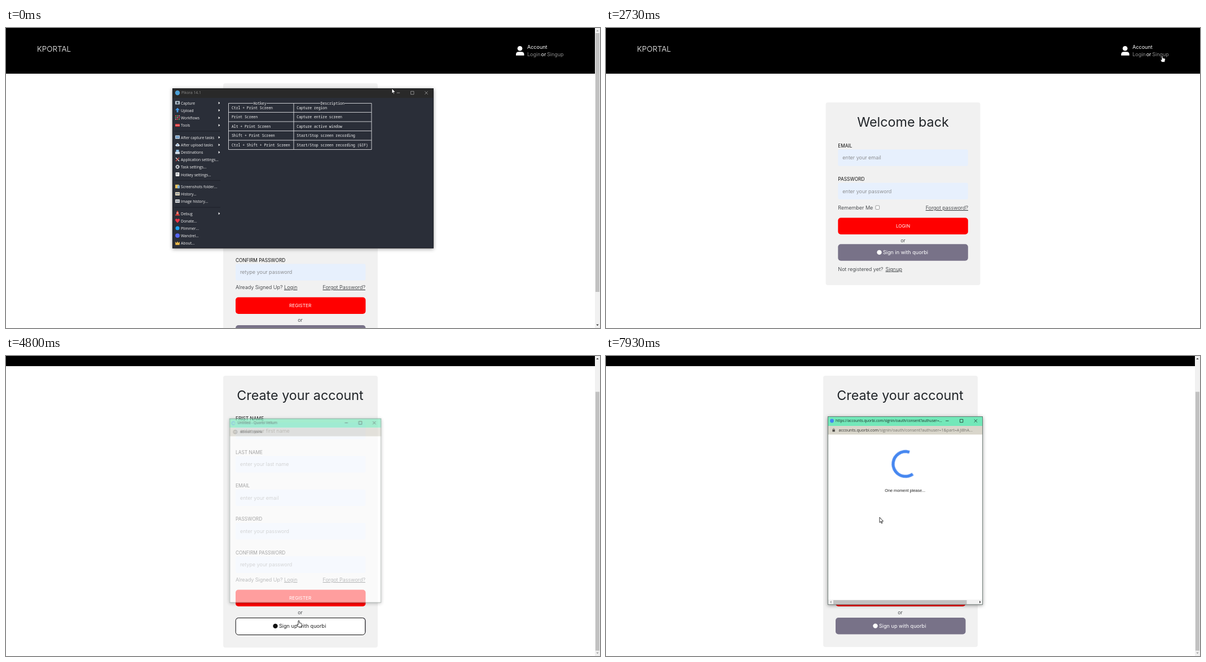
Recreate the animation shown at these times as an HTML page. Size 1053 by 532 pixels, loop 8 s.

```html
<!DOCTYPE html>
<html lang="en">
<head>
<meta charset="utf-8">
<title>Account sign-up demo</title>
<style>
html, body { margin: 0; width: 100%; height: 100%; overflow: hidden; background: #fff; }
svg { display: block; width: 1053px; height: 532px; }
text { font: 300 9.1px Inter, sans-serif; fill: #212529; white-space: pre; }
.logo { font-size: 13.5px; fill: #fff; }
.nav { font-size: 9px; fill: #fff; font-weight: 400; }
.dim { font-size: 9px; fill: #8b8b8b; font-weight: 400; }
.h1 { font-size: 23.3px; font-weight: 400; }
.label { font-size: 8.35px; font-weight: 400; fill: #111; }
.ph { fill: #757575; }
.u { text-decoration: underline; }
.caps { font-size: 8.2px; font-weight: 400; fill: #fff; }
.btn { fill: #fff; font-weight: 400; }
.ink { fill: #222; font-weight: 400; }
.menu { font: 6.75px "Open Sans", sans-serif; fill: #f0f0f0; }
.title { font: 6.4px "Open Sans", sans-serif; fill: #1c2b26; }
.url { font: 7.2px "Open Sans", sans-serif; fill: #2f2f2c; }
.path { fill: #74726b; }
.stat { font: 6.25px "Open Sans", sans-serif; fill: #173a2d; }
.mono { font: 6.4px "Noto Sans Mono", "DejaVu Sans Mono", monospace; fill: #f4f4f4; }
.choose { font-size: 12.4px; font-weight: 400; fill: #202124; }
.small { font: 7.4px Roboto, sans-serif; fill: #5f6368; }
.cont { font: 8.8px Roboto, sans-serif; fill: #3c4043; }
.link { fill: #1a73e8; font-weight: 500; }
.name { font: 500 7.6px Roboto, sans-serif; fill: #3c4043; }
.mail { font: 6.6px Roboto, sans-serif; fill: #5f6368; }
.init { font: 8.6px Roboto, sans-serif; fill: #fff; }
.wait { font: 7.3px "Liberation Sans", sans-serif; fill: #222; }

/* percent = milliseconds / 80 */
.signup, .login, .minHot, .uLogin, .uSign, .hotBtn, .hand, .arrow, .blank,
.auth, .list, .row, .fade, .consent, .load, .topArrow, .botArrow { animation: 8s step-end infinite; }
.signup { animation-name: signup; }
.login { animation-name: login; }
.minHot { animation-name: minHot; }
.uLogin { animation-name: uLogin; }
.uSign { animation-name: uSign; }
.hotBtn { animation-name: hotBtn; }
.hand { animation-name: hand; }
.arrow { animation-name: arrow; }
.blank { animation-name: blank; }
.auth { animation-name: auth; }
.list { animation-name: list; }
.row { animation-name: row; }
.fade { animation-name: fade; }
.consent { animation-name: consent; }
.load { animation-name: load; }
.topArrow { animation-name: topArrow; }
.botArrow { animation-name: botArrow; }
@keyframes signup { 0%, 36.6% { opacity: 1 } 21.6% { opacity: 0 } }
@keyframes login { 0%, 36.6% { opacity: 0 } 21.6% { opacity: 1 } }
@keyframes minHot { 0% { opacity: 0 } .85%, 100% { opacity: 1 } }
@keyframes uLogin { 0%, 24.1%, 100% { opacity: 0 } 14.1% { opacity: 1 } }
@keyframes uSign { 0%, 39.6%, 100% { opacity: 0 } 35% { opacity: 1 } }
@keyframes hotBtn { 0%, 65.6%, 100% { opacity: 0 } 54.1% { opacity: 1 } }
@keyframes hand { 0%, 24.1%, 39.6%, 65.6%, 79%, 100% { opacity: 0 } 14.1%, 34.1%, 54.1%, 73% { opacity: 1 } }
@keyframes arrow { 0%, 24.1%, 39.6%, 65.6%, 79%, 100% { opacity: 1 } 14.1%, 34.1%, 54.1%, 73% { opacity: 0 } }
@keyframes blank { 0% { opacity: 1 } 67.5%, 100% { opacity: 0 } }
@keyframes auth { 0%, 89.1%, 100% { opacity: 0 } 67.5% { opacity: 1 } }
@keyframes list { 0%, 89.1%, 100% { opacity: 0 } 71.6% { opacity: 1 } }
@keyframes row { 0% { opacity: 0 } 73%, 100% { opacity: 1 } }
@keyframes fade { 0% { opacity: 0 } 79.1%, 100% { opacity: .5 } }
@keyframes consent { 0% { opacity: 0 } 89.1%, 100% { opacity: 1 } }
@keyframes load { 0% { opacity: 0 } 91.6%, 100% { opacity: 1 } }
@keyframes topArrow { 0% { fill: #a3a3a3 } 44.6%, 100% { fill: #404040 } }
@keyframes botArrow { 0% { fill: #404040 } 46%, 100% { fill: #a3a3a3 } }

.win { animation: win 8s linear infinite; transform-origin: 526px 390px; }
@keyframes win {
  0%, 4.1% { opacity: 1; transform: none; animation-timing-function: ease-in }
  7.4%, 100% { opacity: 0; transform: translateY(70px) scale(.9) }
}
.scroll { animation: scroll 8s ease-in-out infinite; }
.thumb { animation: thumb 8s ease-in-out infinite; }
@keyframes scroll { 0%, 44.5% { transform: none } 46.2%, 100% { transform: translateY(-63px) } }
@keyframes thumb { 0%, 44.5% { transform: none } 46.2%, 100% { transform: translateY(54.5px) } }
.stat1 { animation: stat1 8s linear infinite; }
.stat2 { animation: stat2 8s linear infinite; }
@keyframes stat1 { 0%, 15% { opacity: 0 } 18%, 24.1% { opacity: 1 } 26.6%, 100% { opacity: 0 } }
@keyframes stat2 { 0%, 35.9% { opacity: 0 } 38.4%, 45.4% { opacity: 1 } 47.3%, 100% { opacity: 0 } }
.popup { animation: popup 8s linear infinite; transform-origin: 530.5px 274px; }
@keyframes popup {
  0%, 59.1% { opacity: 0; transform: scale(.94) }
  60% { opacity: .62; transform: scale(.978) }
  61.4%, 100% { opacity: 1; transform: none }
}
.spin { animation: spin 8s linear infinite; transform-origin: 531px 191.5px; }
@keyframes spin { 0% { transform: rotate(-1849.2deg) } 100% { transform: rotate(70.8deg) } }
.cursor { animation: cursor 8s ease-in-out infinite; }
@keyframes cursor {
  0%, .8% { transform: translate(684px, 107px) }
  1.6%, 5% { transform: translate(693px, 112px) }
  14.1%, 23.75% { transform: translate(938px, 46px) }
  28.1% { transform: translate(640px, 270px); animation-timing-function: ease-in }
  33.4% { transform: translate(944px, 60px); animation-timing-function: linear }
  34.1%, 39.1% { transform: translate(986px, 49px) }
  44.1%, 49.4% { transform: translate(572px, 336px) }
  55%, 62.5% { transform: translate(519px, 469px) }
  73.75%, 91.2% { transform: translate(489px, 288px) }
  99%, 100% { transform: translate(485px, 286px) }
}
</style>
</head>
<body>
<svg id="stage" viewBox="0 0 1053 532" xmlns="http://www.w3.org/2000/svg"></svg>
<script>
const T = (x, y, s, cls = '', anchor = 'start') =>
  `<text x="${x}" y="${y}" class="${cls}" text-anchor="${anchor}">${s}</text>`;
const R = (x, y, w, h, fill, rx = 0, more = '') =>
  `<rect x="${x}" y="${y}" width="${w}" height="${h}" fill="${fill}" rx="${rx}" ${more}/>`;
const C = (x, y, r, fill, more = '') => `<circle cx="${x}" cy="${y}" r="${r}" fill="${fill}" ${more}/>`;
const P = (d, fill, more = '') => `<path d="${d}" fill="${fill}" ${more}/>`;
const L = (d, stroke, w = 1, more = '') => P(d, 'none', `stroke="${stroke}" stroke-width="${w}" ${more}`);
const G = (cls, ...kids) => `<g class="${cls}">${kids.join('')}</g>`;
const at = (x, y, s) => `<g transform="translate(${x} ${y})">${s}</g>`;

const header = dx => R(0, 0, 1053, 81, '#000') + T(55, 41.5, 'KPORTAL', 'logo') + at(dx, 0,
  C(911, 36.3, 4.3, '#fff') + P('M904 48.8V47Q904 42.2 908.5 42.2H914Q918.5 42.2 918.5 47V48.8Z', '#fff') +
  T(924, 37, 'Account', 'nav') + T(924, 50, 'Login', 'dim') +
  T(948.5, 50, 'or', 'nav') + T(959, 50, 'Singup', 'dim') +
  L('M924 51.5H946.5', '#8b8b8b', .7, 'class="uLogin"') +
  L('M959 51.5H989', '#8b8b8b', .7, 'class="uSign"'));

const field = (x, y, label, ph) => T(x, y, label, 'label') +
  R(x, y + 3.6, 230.5, 29.5, '#e7f0fd', 3) + T(x + 8, y + 21.6, ph, 'ph');
const button = (x, y, fill) => R(x, y, 230.5, 29.5, fill, 5);
const brandBtn = (x, y, s, tx, dot = '#fff', cls = 'btn') =>
  C(tx - 6.5, y + 14.6, 4.2, dot) + T(tx, y + 17.8, s, cls);

function signup() {
  const fields = [['FRIST NAME', 'enter your first name'], ['LAST NAME', 'enter your last name'],
    ['EMAIL', 'enter your email'], ['PASSWORD', 'enter your password'],
    ['CONFIRM PASSWORD', 'retype your password']];
  const hot = G('hotBtn', R(385, 572, 274, 8, '#f1f1f1', 4),
    R(407.2, 527.5, 229.6, 30, '#fff', 5, 'stroke="#111"'),
    brandBtn(407, 527.3, 'Sign up with quorbi', 484, '#111', 'ink'));
  const page = G('scroll', header(0), R(385, 98, 274, 481, '#f1f1f1', 4),
    T(521.5, 141, 'Create your account', 'h1', 'middle'),
    ...fields.map((f, i) => field(407, 177.4 + 59.3 * i, ...f)),
    T(407, 463, 'Already Signed Up?'), T(493, 463, 'Login', 'u'),
    T(637, 463, 'Forgot Password?', 'u', 'end'),
    button(407, 477.5, '#f00'), T(521.7, 495.2, 'REGISTER', 'caps', 'middle'),
    T(521.5, 520.5, 'or', '', 'middle'),
    button(407, 527, '#787288'), brandBtn(407, 527, 'Sign up with quorbi', 484), hot);
  const bar = R(1044, 0, 9, 532, '#f1f1f1') + R(1045, 9, 7, 459, '#c1c1c1', 0, 'class="thumb"') +
    P('M1046.2 6H1050.8L1048.5 3.4Z', '#a3a3a3', 'class="topArrow"') +
    P('M1046.2 525.6H1050.8L1048.5 528.2Z', '#404040', 'class="botArrow"');
  return G('signup', R(0, 0, 1053, 532, '#fff'), page, bar);
}

const login = () => G('login', R(0, 0, 1053, 532, '#fff'), header(9.2),
  R(389.5, 132, 274, 324, '#f1f1f1', 4), T(526.5, 175, 'Welcome back', 'h1', 'middle'),
  field(411.3, 211.6, 'EMAIL', 'enter your email'), field(411.3, 270.9, 'PASSWORD', 'enter your password'),
  T(411.3, 322, 'Remember Me'), R(478, 315, 6.6, 6.6, '#fff', 1, 'stroke="#767676" stroke-width=".7"'),
  T(642, 322, 'Forgot password?', 'u', 'end'),
  button(411.3, 336.5, '#f00'), T(526.5, 354.2, 'LOGIN', 'caps', 'middle'),
  T(526.5, 379.8, 'or', '', 'middle'),
  button(411.3, 383.3, '#787288'), brandBtn(411.3, 383.3, 'Sign in with quorbi', 491),
  T(411.3, 430.7, 'Not registered yet?'), T(495.5, 430.7, 'Signup', 'u'));

const winBtns = (x, y, gap, color) =>
  L(`M${x - 2.7} ${y}h5.4M${x + gap - 2.7} ${y - 2.7}h5.4v5.4h-5.4zM${x + 2 * gap - 2.7} ${y - 2.7}l5.4 5.4m0 -5.4l-5.4 5.4`, color, .8);

function toolWindow() {
  const photo = (a, b) => R(0, 1, 8, 6, a, .6) + R(1, 2.6, 6, 2.6, b);
  const dots = [0, 3, 6].map(x => [0, 3, 6].map((y, i) =>
    R(x, y, 2, 2, ['#e04848', '#4fae62', '#d56a9a'][(i + x / 3) % 3])).join('')).join('');
  // label, centre line, submenu, icon in an 8 px box
  const items = [
    ['Capture', 133, 1, R(0, 1, 8, 6, '#b9c6d2', .6) + C(4, 4.2, 1.9, '#3b4754')],
    ['Upload', 146, 1, P('M4 0L8 4H5.4V8H2.6V4H0Z', '#4a9be8')],
    ['Workflows', 159.3, 1, dots],
    ['Tools', 172.5, 1, R(0, 2, 8, 5, '#d9363a', .6) + R(0, 4, 8, .8, '#f2c4c0')],
    ['After capture tasks', 194, 1, photo('#c3d5e6', '#5f92c4')],
    ['After upload tasks', 207.2, 1, P('M1.6 7Q-.4 6.4 .6 4.4Q1.6 3.6 2 3.6Q3 .6 5.4 2Q6.2 2.6 6.2 3.6Q8.4 4 7.8 6Q7.4 7 6.4 7Z', '#e2e7ee') + P('M4 3.4L5.6 5.2H2.4Z', '#3f79b8')],
    ['Destinations', 220.4, 1, R(1.5, 0, 5, 4, '#8fc2ea') + R(0, 3.6, 8, 4, '#d3dce6', .6)],
    ['Application settings...', 233.5, 0, L('M1 1L7 7', '#d9dde2', 1.4) + L('M7 1L1 7', '#d24a43', 1.4)],
    ['Task settings...', 246.7, 0, C(4, 4, 2.3, 'none', 'stroke="#d8dbe0" stroke-width="1.5"') + C(4, 4, 3.4, 'none', 'stroke="#d8dbe0" stroke-dasharray="1.3 1.37"')],
    ['Hotkey settings...', 260, 0, R(.6, .6, 6.8, 6.8, '#eee', .8) + R(2, 1.6, 3.4, 3.2, '#b5b8bf')],
    ['Screenshots folder...', 281.2, 0, R(0, 1, 6.6, 6.6, '#e9c25b', .5) + R(4, 2.4, 4, 5.2, '#7fb0d8')],
    ['History...', 294.4, 0, photo('#e5d9b9', '#9aa0a8')],
    ['Image history...', 307.6, 0, photo('#d9d9d9', '#8e98a3')],
    ['Debug', 329, 1, P('M3 0H5L6.6 6.4H8V8H0V6.4H1.4Z', '#e0453c') + R(2.2, 3, 3.6, 1.2, '#f6e6e2')],
    ['Donate...', 342.2, 0, P('M4 8L.6 4.4Q-.8 1.4 1.6 .6Q3.2 .4 4 2Q4.8 .4 6.4 .6Q8.8 1.4 7.4 4.4Z', '#ee3347')],
    ['Plimmer...', 355.4, 0, C(4, 4, 3.5, '#1da1f2')],
    ['Wandrel...', 368.6, 0, C(4, 4, 3.9, '#5865f2')],
    ['About...', 381.8, 0, P('M.4 7.4L0 1.8L2.4 4L4 1L5.6 4L8 1.8L7.6 7.4Z', '#edbb4c')],
  ];
  const keys = [['Ctrl + Print Screen', 'Capture region'], ['Print Screen', 'Capture entire screen'],
    ['Alt + Print Screen', 'Capture active window'], ['Shift + Print Screen', 'Start/Stop screen recording'],
    ['Ctrl + Shift + Print Screen', 'Start/Stop screen recording (GIF)']];
  const body = '#2a2e38';
  return G('win', R(295, 107, 463, 283.5, body, 0, 'filter="url(#shadow)"'),
    R(295, 107, 463, 17, '#292929'), R(683, 107, 24, 17, '#454545', 0, 'class="minHot"'),
    R(295.3, 107.3, 462.4, 283, 'none', 0, 'stroke="#191b20" stroke-width=".7"'),
    C(304, 115, 4.2, '#4b9fd5'), T(311, 117.4, 'Pikora 14.1', 'menu" style="fill:#8d8d8d'),
    winBtns(695.5, 115, 24.8, '#a5a5a5'),
    ...[183, 270.3, 318].map(y => L(`M298 ${y}H380`, '#1d2027', .8)),
    ...items.map(([s, y, sub, icon]) => at(300, y - 4.5, icon) + T(310, y + 2.5, s, 'menu') +
      (sub ? P(`M376.7 ${y - 2.3}L379.4 ${y}L376.7 ${y + 2.3}Z`, '#f4f4f4') : '')),
    L('M394.5 133.5H648V215.5H394.5ZM510 133.5V215.5M394.5 149.5H648M394.5 166H648M394.5 182.5H648M394.5 199H648', '#dcdde0', .9),
    R(438, 130, 24, 6, body), R(557, 130, 43, 6, body),
    T(450, 135.6, 'Hotkey', 'mono', 'middle'), T(578.7, 135.6, 'Description', 'mono', 'middle'),
    ...keys.map(([k, d], i) => {
      const y = i ? 144 + 16.45 * i : 143.8;
      return T(400, y, k, 'mono') + T(515.3, y, d, 'mono');
    }));
}

function popup() {
  const lock = R(401.4, 130.4, 4.4, 3.8, '#4d4b46', .5) + L('M402.3 130.6V129.6Q403.6 127 404.9 129.6V130.6', '#4d4b46', .8);
  const url = s => T(412.5, 134, `accounts.quorbi.com<tspan class="path">${s}</tspan>`, 'url');
  const logo = C(400.5, 115, 3.4, '#4285f4');
  const mail = ['m.dorwe3652', 'm.dorwe0000', 'dorwedev3652', 'm.dorwe0077', 'm.dorwe3602', 'm.dorwe2222'];
  const names = ['LoftTab Code', 'Owen Tarl', 'M Dorwe', 'M Dorwe', 'D0RWE', 'M Dorwe'];
  const tints = ['#0a4066', '#5a2db9', '#455a64', '#2f74b5', '#54403e', '#0097a7'];
  const extra = { 0: [2, -1, '#2d7590'], 1: [-1, 2, '#8052d4'], 3: [1, -1, '#68ad73'], 4: [-2, 2, '#924c47'] };
  const people = names.map((n, i) => {
    const y = 252.8 + 33.45 * i, e = extra[i];
    return C(423.5, y, 8, tints[i]) +
      (e ? C(423.5 + e[0], y + e[1], 4.2, e[2]) : T(423.5, y + 3.1, 'M', 'init', 'middle')) +
      T(437.5, y - 2.4, n, 'name') + T(437.5, y + 7.4, mail[i] + '@zmail.test', 'mail') +
      (i < 5 ? L(`M416 ${y + 16.4}H637`, '#dadce0', .7) : '');
  });
  const list = G('list', R(394, 269.4, 265, 33, '#f0f3f3', 0, 'class="row"'),
    C(406.3, 150, 3.4, '#4285f4'), T(417, 152.6, 'Sign in with Quorbi', 'small'),
    L('M394 159H659', '#dadce0', .8),
    T(526, 200, 'Choose an account', 'choose', 'middle'),
    T(526, 219, 'to continue to <tspan class="link">tk7</tspan>', 'cont', 'middle'), ...people,
    R(394, 139.5, 265, 301, '#fff', 0, 'class="fade"'),
    R(659, 139.5, 8.7, 301.5, '#f1f1f1'), R(660, 149, 7, 175, '#c1c1c1'),
    P('M661 146H665.6L663.3 143.4Z', '#a3a3a3'), P('M661 434.8H665.6L663.3 437.4Z', '#404040'));
  const blank = G('blank', L('M403 115.5A2.9 2.9 0 1 0 402.6 117.2', '#4285f4', 1),
    T(407.5, 117.3, 'Untitled - Quorbi Vellum', 'title'),
    C(403.5, 131.5, 3.2, 'none', 'stroke="#4d4b46" stroke-width=".8"'), L('M403.5 129.7V130.5M403.5 131.2V133.3', '#4d4b46', .8),
    T(412.5, 134, 'about:blank', 'url'));
  const auth = G('auth', logo, T(407, 117.3, 'Sign in - Quorbi Accounts - Quorbi Vellum', 'title'),
    lock, url('/o/oauth2/v2/auth/oauthchooseaccount?gsiwebs...'));
  const consent = G('consent', logo,
    T(407, 117.3, 'https://accounts.quorbi.com/signin/oauth/consent?authuser=...', 'title'),
    lock, url('/signin/oauth/consent?authuser=1&amp;part=AJi8hA...'),
    R(394, 432, 273.7, 8.7, '#f1f1f1'), R(403, 433, 236.5, 7, '#c1c1c1'),
    P('M399.6 434V438.6L397 436.3Z', '#a3a3a3'), P('M662 434V438.6L664.6 436.3Z', '#404040'),
    G('load', C(531, 191.5, 22, 'none', 'class="spin" stroke="#4687f0" stroke-width="5.4" pathLength="360" stroke-dasharray="234 126"'),
      T(530.2, 240.6, 'One moment please...', 'wait', 'middle')));
  return G('popup', R(393, 107, 275, 334, '#fff', 0, 'filter="url(#shadow)"'),
    R(393, 107, 275, 17, '#73e8b9'), R(393, 124, 275, 15.3, '#d9d6cb'),
    winBtns(604.8, 115, 25.3, '#1c2b26'), blank, auth, list, consent,
    R(393.4, 107.4, 274.2, 333.4, 'none', 0, 'stroke="#56655f" stroke-width=".8"'));
}

const status = (cls, w, s) => G(cls, P(`M0 520H${w - 2}Q${w} 520 ${w} 522V532H0Z`, '#73e8b9'), T(2.6, 528.4, s, 'stat'));
const outline = 'stroke="#000" stroke-width=".8" stroke-linejoin="round"';
const cursor = G('cursor',
  P('M0 0V9.4L2.1 7.4L3.5 10.8L4.9 10.2L3.5 7H6.5Z', '#fff', `class="arrow" ${outline}`),
  P('M-1 .9Q0 -.6 1 .9V4.2L4.4 5Q5.6 5.3 5.4 6.6L4.5 11.6H-.8L-3 8Q-3.2 6.4 -1.8 7L-1 7.7Z', '#fff', `class="hand" ${outline}`));

document.getElementById('stage').innerHTML =
  '<defs><filter id="shadow" x="-10%" y="-10%" width="120%" height="120%">' +
  '<feDropShadow dx="0" dy="1.5" stdDeviation="3" flood-color="#000" flood-opacity=".4"/></filter></defs>' +
  signup() + login() + toolWindow() + status('stat1', 91, 'localhost:3000/account/login') +
  status('stat2', 96, 'localhost:3000/account/signup') + popup() + cursor;
</script>
</body>
</html>
```
